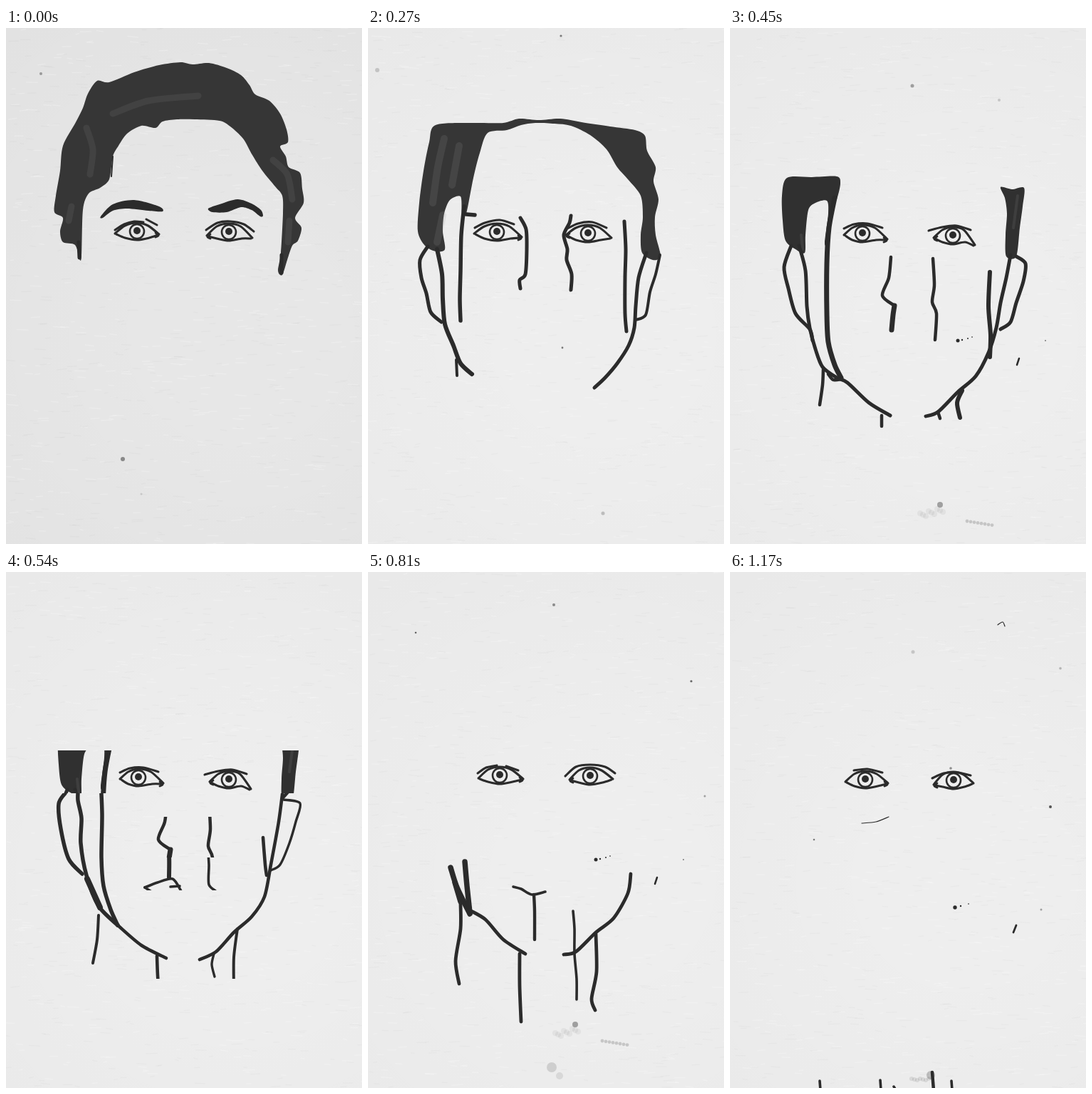
An HTML page with a canvas for the animation above (1260 ms loop, 500 px wide and 723 px high).

```html
<!DOCTYPE html>
<html lang="en">
<head>
<meta charset="utf-8">
<title>Falling face</title>
<style>
html, body { margin: 0; width: 100%; height: 100%; overflow: hidden; background: #ededed; }
canvas { display: block; width: 500px; height: 723px; }
</style>
</head>
<body>
<canvas id="stage" width="500" height="723"></canvas>
<script>
const W = 500, H = 723, STEP = 90, COUNT = 14;
const ctx = document.getElementById('stage').getContext('2d');
const INK = '#2b2b2b', HAIR = '#363636';

// Smooth curve through "x,y x,y ..."
function trace(text, closed) {
  const p = text.split(' ').map(s => s.split(',').map(Number)), n = p.length;
  const at = i => closed ? p[(i + n) % n] : p[Math.max(0, Math.min(n - 1, i))];
  ctx.beginPath();
  ctx.moveTo(...p[0]);
  for (let i = 0; i < (closed ? n : n - 1); i++) {
    const [a, b, c, d] = [at(i - 1), at(i), at(i + 1), at(i + 2)], k = 7;
    ctx.bezierCurveTo(b[0] + (c[0] - a[0]) / k, b[1] + (c[1] - a[1]) / k,
      c[0] - (d[0] - b[0]) / k, c[1] - (d[1] - b[1]) / k, c[0], c[1]);
  }
}
function pen(width, ...lines) {
  ctx.lineWidth = width;
  for (const l of lines) { trace(l); ctx.stroke(); }
}
function blob(text, color = HAIR) {
  ctx.fillStyle = color;
  trace(text, true);
  ctx.fill();
}
function streaks(alpha, width, ...lines) {
  ctx.save();
  ctx.strokeStyle = `rgba(150,150,150,${alpha})`;
  pen(width, ...lines);
  ctx.restore();
}
function dot(x, y, r, alpha = 1) {
  ctx.fillStyle = `rgba(43,43,43,${alpha})`;
  ctx.beginPath();
  ctx.arc(x, y, r, 0, 7);
  ctx.fill();
}

// Iris centre, corners, side of the inner corner (1 = right), lid lines
function eye(x, y, xl, yl, xr, yr, side, ...lids) {
  const l = x - xl, r = xr - x;
  pen(3.1,
    `${xl},${yl} ${x - l * .55},${y - 8} ${x},${y - 12} ${x + r * .5},${y - 8} ${xr},${yr}`,
    `${xl + 2},${yl + 1} ${x - l * .55},${y + 9} ${x},${y + 12} ${x + r * .55},${y + 9} ${xr - 2},${yr + 1}`,
    ...lids);
  const cx = side > 0 ? xr : xl, cy = side > 0 ? yr : yl;
  pen(2.8, `${cx - side * 5},${cy - 2} ${cx - side},${cy + 2} ${cx - side * 5},${cy + 4}`);
  ctx.lineWidth = 2.6;
  ctx.beginPath();
  ctx.arc(x, y, 10, 0, 7);
  ctx.stroke();
  dot(x, y - 1, 5);
}

const marks = () => { // stains that recur on several sheets
  dot(320, 438, 2.5); dot(326, 437, 1.2); dot(334, 435, 1); dot(340, 433, 1, .7);
  pen(2.5, '403,472 406,463');
  dot(443, 438, 1, .6);
};
const smudge = (x, y) => {
  for (let i = 0; i < 9; i++) dot(x - 28 + i * 4, y + 9 - i + i % 3 * 3, 4, .06);
  dot(x, y - 3, 4, .4);
  for (let i = 0; i < 8; i++) dot(x + 38 + i * 5, y + 20 + i * .8, 2.4, .2);
};

const poses = {
  0: {
    outer() {
      blob('103,323 97,304 80,300 76,285 80,266 68,258 70,235 76,200 80,165 98,132 108,112 115,92 128,74 145,76 180,62 215,52 245,48 262,51 285,49 310,56 330,66 342,80 350,93 370,102 385,120 394,142 396,160 385,166 393,180 397,195 413,203 416,225 418,245 406,266 415,280 410,298 402,305 395,325 388,346 382,340 386,315 389,260 388,235 378,222 360,200 346,178 333,155 315,138 300,130 265,128 240,128 220,131 210,140 190,137 170,148 158,165 150,180 145,212 132,224 116,232 108,255 106,320');
      streaks(.13, 9, '150,120 200,102 270,95', '113,140 122,170 118,205', '88,270 92,250', '375,185 395,205 402,240', '398,270 396,300');
      pen(5, '102,300 103,322', '387,318 387,343');
      pen(2, '150,180 148,208');
    },
    inner() {
      blob('133,264 150,247 180,241 215,250 220,257 200,256 170,253 150,256 136,266', INK);
      blob('284,253 300,247 325,240 345,246 358,255 361,263 357,264 345,255 330,251 310,258 290,258', INK);
    },
    eyes() {
      eye(184, 285, 153, 288, 215, 289, 1, '153,283 166,275 180,271 193,272', '197,268 212,276');
      eye(313, 286, 282, 291, 346, 294, -1, '281,283 297,273 315,271 334,275 348,285');
    },
    specks() { dot(164, 604, 3, .5); dot(49, 64, 2, .4); dot(190, 653, 1.5, .15); }
  },
  3: {
    outer() {
      blob('95,136 150,133 190,133 212,127 240,129 270,127 300,132 340,138 375,143 389,151 392,172 404,195 401,215 408,240 403,265 404,290 411,320 400,325 385,315 383,290 386,265 383,235 365,212 350,195 335,170 312,150 285,137 262,134 235,133 215,136 195,143 168,147 157,175 148,210 138,260 132,260 130,236 115,241 107,260 105,285 108,310 95,313 80,305 70,285 72,245 78,200 86,160');
      streaks(.16, 10, '107,155 98,195 91,245', '128,165 118,220', '105,262 97,300');
      pen(5.5, '135,250 131,290 130,340 129,380 130,410', '138,261 150,262');
      pen(5, '84,306 73,325 75,350 82,372 88,398 103,412', '391,315 380,350 376,390 374,420 366,445 350,470 333,490 318,504', '360,271 362,310 361,350 361,400 363,425');
      pen(6, '97,310 104,345 105,380 108,415 120,445 130,470 146,485');
      pen(4, '124,465 125,487', '410,318 404,345 396,370 390,402 376,409');
    },
    inner() {
      pen(5, '214,266 222,282 223,310 221,345 213,353 214,365', '285,263 283,273 275,290 280,310 279,325 286,345 285,367');
    },
    eyes() {
      eye(181, 286, 149, 288, 216, 293, 1, '150,280 164,273 185,269 205,275');
      eye(309, 288, 278, 290, 342, 294, -1, '278,282 295,274 315,272 335,280');
    },
    specks() { dot(271, 11, 1.6, .6); dot(273, 448, 1.4, .6); dot(13, 59, 3, .2); dot(330, 680, 2.5, .25); }
  },
  5: {
    outer() {
      blob('80,210 115,209 150,208 155,218 150,240 143,252 136,300 133,300 138,260 136,242 120,245 110,255 106,290 105,315 92,310 78,298 74,270 73,235', '#303030');
      blob('380,223 396,226 413,224 411,250 407,280 402,320 388,320 387,290 389,260 386,238', '#303030');
      streaks(.15, 4, '100,290 102,310', '404,235 398,280');
      pen(7, '147,238 139,280 136,330 136,400 138,440 147,472 156,490');
      pen(5, '97,305 106,340 108,390 112,420 120,450 130,475 150,490 165,497 195,525 225,543', '86,305 76,335 82,365 92,400 112,422 116,438', '402,320 415,330 412,355 402,385 394,412 380,422', '394,318 388,350 380,385 374,420 363,455 345,488 320,510 292,538 275,544');
      pen(6, '365,342 363,390 366,430 365,461', '326,508 319,525 323,546');
      pen(4.5, '131,478 130,500 126,528', '213,543 213,558', '138,485 145,493 157,492', '292,538 295,547');
    },
    inner() {
      pen(4.5, '226,321 223,350 214,375 231,389', '285,323 287,360 284,384 290,400 288,437');
      pen(7, '231,389 229,402 227,423');
    },
    eyes() {
      eye(186, 288, 160, 290, 221, 296, 1, '160,281 174,275 193,274 214,280');
      eye(313, 291, 286, 294, 344, 304, -1, '279,284 298,279 318,277 338,283');
    },
    specks() { dot(256, 81, 2.5, .4); dot(378, 101, 2, .2); marks(); smudge(295, 671); }
  },
  7: {
    outer() {
      pen(5.5, '84,295 100,298 101,320 106,345 105,380 113,425 130,468 157,495', '133,291 135,340 134,400 137,440 147,473 157,495', '83,310 74,325 77,360 88,402 107,423');
      pen(8, '114,430 132,470');
      pen(4.6, '157,495 190,523 225,541', '212,538 213,565 215,591', '389,304 383,350 372,410 363,455 345,483 320,505 295,532 272,543', '387,305 399,304 389,316', '361,372 364,410 366,425');
      pen(4, '130,481 128,515 122,548', '325,500 320,540 320,583');
      pen(3.4, '390,319 413,324 407,350 398,380 385,410 372,418', '292,535 289,550 293,567');
    },
    inner() {
      pen(6, '210,368 213,379 228,389 229,428');
      pen(3.6, '195,442 213,435 234,430 246,447', '195,442 215,454 235,460 231,466', '231,441 244,440', '283,381 285,410 285,438 297,450 287,460 288,488');
    },
    eyes() {
      eye(182, 287, 151, 291, 217, 293, 1, '151,285 160,278 175,275', '183,274 200,273 213,279');
      eye(312, 291, 281, 295, 344, 295, -1, '284,282 300,275 318,275 335,280 347,289');
    },
    specks() { dot(271, 30, 1.6, .7); dot(22, 118, 3, .2); dot(499, 343, 2); dot(449, 637, 1.3, .6); dot(266, 545, 1.5); dot(317, 702, 3, .2); }
  },
  9: {
    outer() {
      pen(7.5, '116,414 125,442 143,479', '136,406 139,440 143,477', '122,435 130,462');
      pen(4.8, '143,474 165,487 190,515 221,535', '130,465 130,500 123,545 128,577', '213,535 213,580 215,630', '369,423 365,450 345,485 320,505 292,532 275,536', '320,507 321,560 314,598 319,614');
    },
    inner() {
      pen(3.6, '204,441 215,444 230,452 249,448', '288,475 290,500 290,535 293,570 293,599');
      pen(4.4, '233,452 234,475 234,515');
    },
    eyes() {
      eye(185, 285, 155, 289, 218, 290, 1, '154,282 166,274 181,271', '194,272 211,278');
      eye(312, 286, 283, 291, 344, 290, -1, '277,286 292,273 312,270 333,273 347,282');
    },
    specks() {
      ctx.save(); ctx.translate(0, -35); marks(); ctx.restore();
      dot(261, 46, 2, .5); dot(67, 85, 1.3, .7); dot(454, 153, 1.6, .7); dot(473, 314, 1.5, .4);
      smudge(291, 637); dot(258, 694, 7, .15); dot(269, 706, 5, .1);
    }
  },
  11: {
    outer() {
      pen(4.6, '130,500 124,545 131,600 129,660 130,705', '168,501 190,518 214,537 213,555', '213,550 213,620 213,712', '320,512 318,560 315,620 317,712');
      pen(6, '213,537 213,552');
    },
    inner() { pen(4, '230,575 231,620 232,661', '291,566 291,610 290,673'); },
    eyes() {
      eye(181, 294, 155, 296, 215, 298, 1, '160,286 174,281 191,281 208,286');
      eye(309, 292, 280, 296, 339, 295, -1, '272,291 285,283 310,281 334,283');
    },
    specks() { dot(282, 33, 1.6, .6); dot(31, 121, 3, .2); dot(405, 230, 1.5, .4); dot(162, 310, 2.2, .6); dot(168, 322, 1.8, .6); dot(196, 336, 1.7, .5); dot(407, 352, 1, .8); }
  },
  12: {
    outer() { pen(4.6, '130,606 128,660 127,726', '213,610 212,660 212,726', '315,613 315,670 313,726'); },
    inner() { pen(4, '231,650 231,726', '290,634 287,726'); },
    eyes() {
      eye(186, 292, 158, 294, 219, 296, 1, '167,284 182,279 211,283');
      eye(312, 292, 283, 297, 341, 296, -1, '279,289 300,282 335,284');
    },
    specks() {}
  },
  13: {
    outer() {
      pen(3.6, '126,713 127,726', '211,712 212,726', '311,713 312,726');
      pen(4.5, '284,701 286,726');
    },
    inner() { pen(3.5, '230,721 233,726'); },
    eyes() {
      eye(190, 291, 162, 294, 222, 296, 1, '174,278 193,276 214,281');
      eye(314, 292, 286, 298, 342, 296, -1, '284,289 300,282 320,281 338,285');
    },
    specks() {
      pen(1.2, '185,352 205,350 223,343', '376,74 383,70 386,76');
      dot(257, 112, 2.5, .2); dot(450, 329, 2, .8); dot(118, 375, 1.3, .6); dot(464, 135, 1.8, .3);
      dot(316, 470, 2.7); dot(324, 468, 1.2); dot(335, 465, 1, .7); dot(310, 275, 1.8, .5);
      pen(2.8, '398,505 402,495');
      dot(437, 473, 1.5, .4); dot(282, 705, 6, .25);
      for (let i = 0; i < 7; i++) dot(255 + i * 4, 710 + i % 3, 3, .1);
    }
  }
};

// Steps in between: upper pose, lower pose, then [top, seam, bottom] for the outline and the features
const blends = {
  1: [0, 3, [75, 190, 385], [250, 264, 300]],
  2: [0, 3, [103, 190, 437], [262, 262, 333]],
  4: [3, 5, [168, 300, 520], [293, 330, 395]],
  6: [5, 7, [250, 310, 570], [343, 400, 446]],
  8: [7, 9, [348, 465, 610], [404, 462, 545]],
  10: [9, 11, [452, 540, 670], [508, 600, 632]]
};

function band(top, bottom, draw) {
  if (bottom <= top) return;
  ctx.save();
  ctx.beginPath();
  ctx.rect(0, top, W, bottom - top);
  ctx.clip();
  draw();
  ctx.restore();
}

function paper(n) {
  let seed = n * 977 + 13;
  const rnd = () => (seed = (seed * 16807) % 2147483647) / 2147483647;
  ctx.fillStyle = n ? '#eeeeee' : '#e7e7e7';
  ctx.fillRect(0, 0, W, H);
  const shade = ctx.createRadialGradient(330, 430, 120, 330, 430, 560);
  shade.addColorStop(0, 'rgba(0,0,0,0)');
  shade.addColorStop(1, 'rgba(0,0,0,.025)');
  ctx.fillStyle = shade;
  ctx.fillRect(0, 0, W, H);
  ctx.lineWidth = 1.5;
  for (let i = 0; i < 900; i++) {
    const x = rnd() * W, y = rnd() * H;
    ctx.strokeStyle = i % 2 ? 'rgba(0,0,0,.02)' : 'rgba(255,255,255,.22)';
    ctx.beginPath();
    ctx.moveTo(x, y);
    ctx.lineTo(x + 4 + rnd() * 12, y + rnd() * 3 - 1.5);
    ctx.stroke();
  }
}

function draw(n) {
  ctx.lineCap = ctx.lineJoin = 'round';
  paper(n);
  ctx.strokeStyle = INK;
  const blend = blends[n];
  if (!blend) {
    const p = poses[n];
    p.specks(); p.outer(); p.inner(); p.eyes();
    return;
  }
  const [a, b, outline, features] = blend;
  for (const [part, [top, seam, bottom]] of [['outer', outline], ['inner', features]]) {
    band(top, seam, poses[a][part]);
    band(seam, bottom, poses[b][part]);
  }
  poses[a].eyes();
}

let shown = -1;
const start = performance.now();
function tick() {
  const n = Math.floor((performance.now() - start) / STEP) % COUNT;
  if (n !== shown) draw(shown = n);
  requestAnimationFrame(tick);
}
tick();
</script>
</body>
</html>
```
